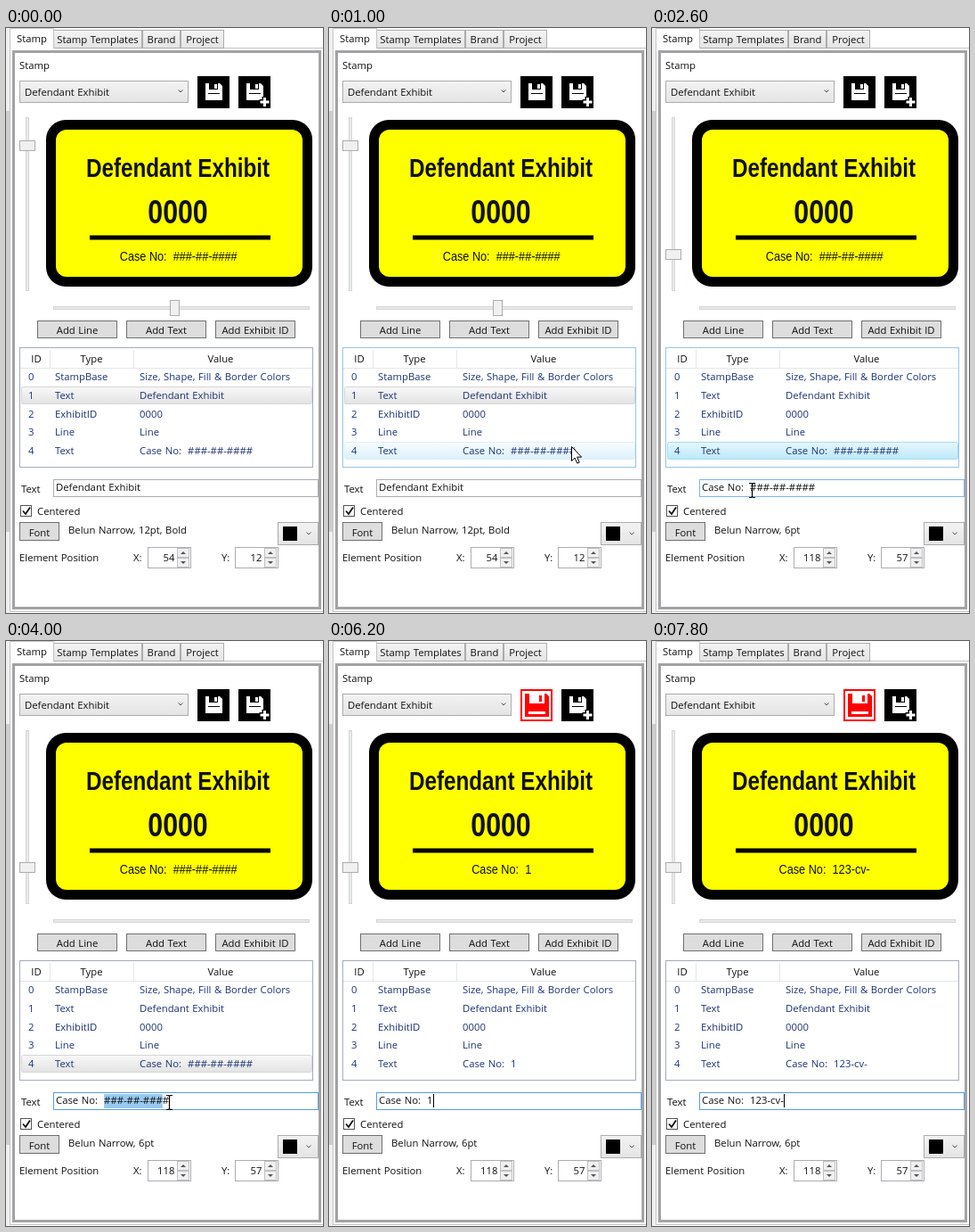
Write an HTML page that moves like this. It is 356 px wide and 656 px high and loops after 8 s.

```html
<!DOCTYPE html>
<html lang="en">
<head>
<meta charset="utf-8">
<title>Stamp editor</title>
<style>
  html, body { margin: 0; width: 100%; height: 100%; overflow: hidden; background: #fff; }
  svg { display: block; width: 100%; height: 100%; }
  text { white-space: pre; font: 11.3px "Open Sans", "Noto Sans", sans-serif; word-spacing: .6px; fill: #111; }
  .row { fill: #1c3474; }
  .narrow { font-family: "Liberation Sans", sans-serif; word-spacing: 0; }
  .bold { font-weight: bold; }
  .soft { filter: blur(.5px); }
</style>
</head>
<body>
<svg viewBox="0 0 356 656">
  <defs id="defs"></defs>
  <g id="scene"></g>
</svg>
<script>
const LOOP = 8000;
const $ = id => document.getElementById(id);

const gradient = (id, top, bottom) =>
  `<linearGradient id="${id}" x2="0" y2="1"><stop stop-color="${top}"/><stop offset="1" stop-color="${bottom}"/></linearGradient>`;
$('defs').innerHTML = gradient('tab', '#f3f3f3', '#e4e4e4') + gradient('idle', '#f8f8f8', '#e3e3e3') +
  gradient('hover', '#f8fcff', '#dcf1fb') + gradient('active', '#e6f8fd', '#bde8f9');

// Outer edges in, with the stroke kept inside them.
const box = (x, y, r, b, fill, stroke = 'none', w = 1, round = 0) => {
  const o = stroke === 'none' ? 0 : w / 2;
  return `<rect x="${x + o}" y="${y + o}" width="${r - x - 2 * o}" height="${b - y - 2 * o}" rx="${round}" fill="${fill}" stroke="${stroke}" stroke-width="${w}"/>`;
};
const path = (d, fill, stroke = 'none', w = 1) =>
  `<path d="${d}" fill="${fill}" stroke="${stroke}" stroke-width="${w}"/>`;
const text = (x, y, s, anchor = 'start', attrs = '') =>
  `<text x="${x}" y="${y}" text-anchor="${anchor}" ${attrs}>${s}</text>`;
const narrow = (x, y, s, size, cls = '') =>
  `<text transform="translate(${x} ${y}) scale(.82 1)" text-anchor="middle" class="narrow ${cls}" style="font-size:${size}px">${s}</text>`;
const button = (x, y, r, b, s) =>
  box(x, y, r, b, '#ddd', '#707070') + text((x + r) / 2, b - 5, s, 'middle');
const chevron = (x, y) => path(`M${x - 2.5} ${y - 1.5}l2.5 2.5 2.5-2.5`, 'none', '#555');

// Value of the last [time, ...value] entry at or before t.
const at = (keys, t) => keys.filter(k => k[0] <= t).pop().slice(1);

const POINTER = [
  [0, 0, 0, ''],
  [200, 345, 48, 'arrow'], [400, 347, 300, 'arrow'], [600, 330, 574, 'arrow'],
  [800, 290, 492, 'arrow'], [1000, 272, 469, 'arrow'], [1200, 270, 473, 'arrow'],
  [2000, 240, 500, 'arrow'], [2200, 165, 560, 'arrow'], [2400, 125, 525, 'beam'],
  [2600, 112, 518, 'beam'], [3400, 126, 518, 'beam'], [3600, 146, 517, 'beam'],
  [3800, 168, 517, 'beam'], [4000, 183, 517, 'beam'], [4600, 196, 517, 'beam'],
  [4800, 209, 517, 'beam'], [6200, 0, 0, '']
];
const SELECTED = [[0, 0], [3400, 2], [3600, 5], [3800, 8], [4000, 10], [4600, 11], [6200, 0]];
const TYPED = [[0, '###-##-####'], [6200, '1'], [6400, '12'], [6600, '123'],
  [7200, '123-'], [7400, '123-c'], [7600, '123-cv'], [7800, '123-cv-']];
const PREFIX = 'Case No:  ';
const TITLE = 'Defendant Exhibit';
const ROW_TOP = 381, ROW = 20.8;

function frame() {
  const tabs = [[53, 153, 'Stamp Templates'], [153, 196, 'Brand'], [196, 245, 'Project']];
  return box(0, 0, 356, 656, '#fff') + box(0, 0, 4, 656, '#f0f0f0') + box(0, 93, 4, 565, '#cdcdcd') +
    box(4, 22, 358, 655, '#fff', '#c4c4c4') +
    tabs.map(([x, r, s]) => box(x, 2, r, 23, 'url(#tab)', '#acacac') + text((x + r) / 2, 17, s, 'middle')).join('') +
    path('M4.5 23V.5H53.5V23', '#fff', '#c4c4c4') + text(12, 16, 'Stamp') +
    box(7, 25, 354, 652, 'none', '#a3a3a6', 3) +
    text(15, 46, 'Stamp') +
    box(15, 59, 205, 84, 'url(#tab)', '#acacac') + text(21, 76, TITLE) + chevron(196, 71);
}

function saveIcon(x, color) {
  if (color === '#000')
    return box(x, 54, x + 36, 90, color) + path(`M${x + 9} 62h16l3 3v16h-19z`, '#fff') +
      box(x + 13, 62, x + 23, 69, color) + box(x + 19, 63, x + 22, 68, '#fff') +
      box(x + 12, 73, x + 25, 74, color);
  return box(x, 54, x + 36, 90, color) + box(x + 2, 56, x + 34, 88, '#fff') +
    path(`M${x + 5} 59h24l3 3v23h-27z`, color) + box(x + 10, 59, x + 27, 70, '#fff') +
    box(x + 21, 61, x + 24, 68, color) + box(x + 9, 79, x + 28, 82, '#fff');
}

function stamp(caseLine, second) {
  const vy = second ? 248 : 126;
  return box(22, 100, 26, 295, '#e7eaea', '#d6d6d6') + box(15, vy, 33, vy + 12, '#f0f0f0', '#acacac') +
    box(53, 312, 341, 316, '#e7eaea', '#d6d6d6') +
    (second ? '' : box(184, 305, 195, 323, '#f0f0f0', '#acacac')) +
    '<g class="soft">' +
    box(45, 103, 344, 290, '#000', 'none', 0, 22) + box(56, 114, 333, 279, '#ff0', 'none', 0, 12) +
    narrow(193, 167, TITLE, 29.6, 'bold') + narrow(193, 219, '0000', 37, 'bold') +
    box(94, 232.5, 297, 237.5, '#000') + narrow(193.7, 261, caseLine, 15.5) + '</g>';
}

function table(caseLine, chosen, style, hovered, lit) {
  const rows = [['StampBase', 'Size, Shape, Fill &amp; Border Colors'], ['Text', TITLE],
    ['ExhibitID', '0000'], ['Line', 'Line'], ['Text', caseLine]];
  const edge = { idle: '#d5d5d5', hover: '#d6f0fa', active: '#a5dcf2' };
  const band = (i, s) => {
    const y = Math.round(ROW_TOP + ROW * i);
    return i < 0 ? '' : box(17, y, 344, y + 20, `url(#${s})`, edge[s], 1, 2);
  };
  return box(15, 358, 345, 493, '#fff', lit ? '#94c6e8' : '#a4abb8') +
    path('M49.5 361V381M143.5 361V381M16 381.5H344', 'none', '#e2e6ea') +
    text(34, 375, 'ID', 'middle') + text(96, 375, 'Type', 'middle') + text(241, 375, 'Value', 'middle') +
    (hovered === chosen ? '' : band(hovered, 'hover')) + band(chosen, style) +
    rows.map((r, i) => [i, ...r].map((s, c) =>
      text([25, 55, 150][c], Math.round(ROW_TOP + 14 + ROW * i), s, 'start', 'class="row"')).join('')).join('');
}

function spinner(x, label, labelX, value) {
  const arrow = (y, d) => path(`M${x + 37} ${y}h6l-3 ${d}z`, '#555');
  return text(labelX, 598, label) + box(x, 582, x + 49, 606, '#fff', '#abadb3') +
    text(x + 30.5, 598, value, 'end') +
    box(x + 33, 583, x + 47, 594, '#f0f0f0', '#c0c0c0') + box(x + 33, 594, x + 47, 605, '#f0f0f0', '#c0c0c0') +
    arrow(590, -3) + arrow(598, 3);
}

function editor(line, second, border) {
  return text(17, 521, 'Text') + box(53, 506, 351, 526, '#fff', border) +
    '<rect id="mark" y="508" height="16" fill="#99c9ef"/>' + text(56, 519, line, 'start', 'id="field"') +
    '<rect id="caret" y="508" width="1" height="15"/>' +
    box(16, 535, 29, 548, '#fff', '#555') + path('M19 541.5l3 3.5 5-7.5', 'none', '#111', 1.8) +
    text(35, 546, 'Centered') + button(15, 554, 60, 575, 'Font') +
    text(70, 567, second ? 'Belun Narrow, 6pt' : 'Belun Narrow, 12pt, Bold') +
    box(305, 554, 351, 580, 'url(#tab)', '#acacac') + box(311, 559, 327, 575, '#000') + chevron(340, 567) +
    text(15, 598, 'Element Position') +
    spinner(159, 'X:', 143, second ? 118 : 54) + spinner(257, 'Y:', 242, second ? 57 : 12);
}

function pointer(x, y, kind) {
  if (kind === 'arrow')
    return path(`M${x + .5} ${y + .5}v16l3.6-3.4 2.7 6 2.4-1-2.6-6h5z`, '#fff', '#000');
  if (kind === 'beam')
    return path(`M${x - 3} ${y - 7.5}h2.5l1 1 1-1h2.5M${x + .5} ${y - 7}v15M${x - 3} ${y + 8.5}h2.5l1-1 1 1h2.5`, 'none', '#000', 1.2);
  return '';
}

let shown = '';
function draw(t) {
  const second = t >= 1400, focused = t >= 3200, typing = t >= 6200;
  const [x, y, kind] = at(POINTER, t);
  const [count] = at(SELECTED, t);
  const line = PREFIX + at(TYPED, t)[0];
  const inside = kind && x > 15 && x < 345 && y > 358 && y < 493;
  const hovered = inside && y > ROW_TOP && y < ROW_TOP + 5 * ROW ? Math.floor((y - ROW_TOP) / ROW) : -1;
  const chosen = typing ? -1 : second ? 4 : 1;
  const caret = typing && !(t >= 6800 && t < 7200);
  const border = focused ? '#569de5' : kind === 'beam' ? '#7eb4ea' : '#abadb3';

  const picture = frame() + saveIcon(215, typing ? '#f00' : '#000') + saveIcon(261, '#000') +
    path('M290.5 77v12M284.5 83h12', 'none', '#000', 6) + path('M290.5 78v10M285.5 83h10', 'none', '#fff', 3) +
    stamp(line, second) +
    button(35, 328, 125, 348, 'Add Line') + button(135, 328, 225, 348, 'Add Text') +
    button(235, 328, 325, 348, 'Add Exhibit ID') +
    table(line, chosen, second && !focused ? 'active' : 'idle', hovered, inside || second && !focused) +
    editor(second ? line : TITLE, second, border) + pointer(x, y, kind);

  const key = picture + count + caret;
  if (key === shown) return;
  shown = key;
  $('scene').innerHTML = picture;
  const field = $('field');
  const start = PREFIX.length;
  $('mark').setAttribute('x', 56 + field.getSubStringLength(0, start));
  $('mark').setAttribute('width', count ? field.getSubStringLength(start, count) : 0);
  $('caret').setAttribute('x', Math.round(56 + field.getComputedTextLength()));
  $('caret').setAttribute('opacity', caret ? 1 : 0);
}

const begin = performance.now();
function tick() {
  draw((performance.now() - begin) % LOOP);
  requestAnimationFrame(tick);
}
tick();
</script>
</body>
</html>
```
